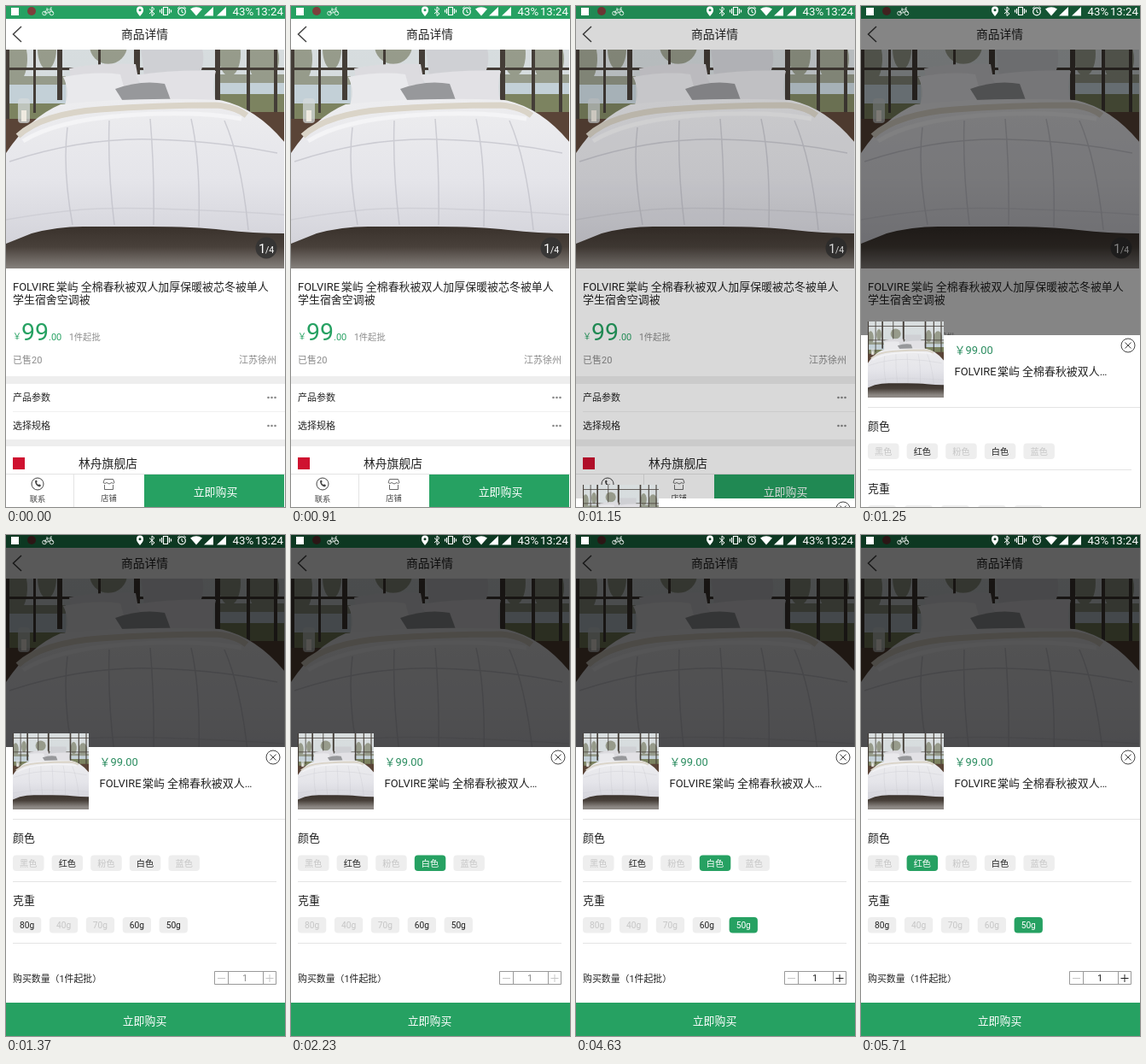
Write an HTML page that moves like this. It is 327 by 586 pixels and loops after 7010 ms.

```html
<!DOCTYPE html>
<html lang="zh-CN">
<head>
<meta charset="utf-8">
<title>商品详情</title>
<style>
  html, body { margin: 0; width: 100%; height: 100%; overflow: hidden; background: #fff; }
  svg { display: block; }
  text { font-family: Roboto, "Noto Sans CJK SC", "Noto Sans CJK", sans-serif; white-space: pre; }
  .line { fill: none; stroke: #444; }
  .white { fill: none; stroke: #fff; }
</style>
</head>
<body>
<svg id="stage" width="327" height="586" viewBox="0 0 327 586">
  <defs>
    <linearGradient id="sky" x2="0" y2="1">
      <stop offset="0" stop-color="#d9dedf"/><stop offset="1" stop-color="#d3dadd"/>
    </linearGradient>
    <linearGradient id="floor" x2="0" y2="1">
      <stop offset="0" stop-color="#352d27"/><stop offset=".45" stop-color="#48403a"/><stop offset=".85" stop-color="#8c8783"/>
    </linearGradient>
    <linearGradient id="quilt" x2="0" y2="1">
      <stop offset="0" stop-color="#ededef"/><stop offset=".55" stop-color="#e5e5ea"/><stop offset="1" stop-color="#d3d3da"/>
    </linearGradient>
    <g id="bed">
      <rect y="-7" width="327" height="150" fill="url(#sky)"/>
      <g fill="#75795f" opacity=".65">
        <ellipse cx="12" cy="62" rx="13" ry="28"/><ellipse cx="48" cy="50" rx="11" ry="24"/>
        <ellipse cx="120" cy="46" rx="22" ry="22"/><ellipse cx="262" cy="56" rx="13" ry="26"/>
        <ellipse cx="302" cy="62" rx="18" ry="28"/>
        <path d="M0 82H70V92H0zM245 80H327V90H245z"/>
      </g>
      <path d="M0 92H70V114H0zM245 90H327V104H245z" fill="#c3d0d7"/>
      <path d="M0 114H70V140H0zM245 103H327V132H245z" fill="#7c8360"/>
      <path d="M0-7h4V140H0zM32-7h3V125h-3zM60-7h6V110h-6zM108-7h3V70h-3zM150-7h7V80h-7zM245-7h6V120h-6zM282-7h4V125h-4zM314-7h4V135h-4zM0 12H327v3H0zM0 72H327v3H0z" fill="#443d37"/>
      <path d="M0 132H50V200H0zM262 124H327V200H262z" fill="#5a4437"/>
      <rect x="14" y="108" width="14" height="29" rx="4" fill="#d4dadb" opacity=".75"/>
      <rect x="18" y="122" width="6" height="13" fill="#eeeae0"/>
      <path d="M0 180H327V250H0z" fill="#352d27"/>
      <rect y="250" width="327" height="70" fill="url(#floor)"/>
      <path d="M158 50H230Q234 66 226 82H162Z" fill="#cfd0d4"/>
      <path d="M74 73Q110 66 152 68L158 102 80 108Z" fill="#dcdbdf"/>
      <path d="M152 81Q200 74 246 76Q240 96 246 112L170 114Z" fill="#e2e1e5"/>
      <path d="M67 83Q106 76 134 80L143 112 68 118Q76 100 67 83Z" fill="#e9e9ec"/>
      <path d="M128 97Q158 86 186 91L193 110 140 116Z" fill="#97989b"/>
      <path d="M64 115Q150 106 250 110Q292 118 327 160V266Q290 266 255 262T170 258T90 258T30 266L0 278V172Q28 130 64 115Z" fill="url(#quilt)"/>
      <path d="M14 152Q42 126 110 121T246 116Q270 118 282 128" fill="none" stroke="#dad4c8" stroke-width="7"/>
      <path d="M20 158Q58 134 140 128T276 132" fill="none" stroke="#f4f4f6" stroke-width="5"/>
      <g fill="none" stroke="#b9b9c2" stroke-width="1.500" opacity=".6">
        <path d="M72 142Q66 190 78 256M121 134Q119 190 127 256M169 132Q174 190 173 256M217 132Q228 180 226 258M256 134Q276 180 284 262"/>
        <path d="M4 182Q90 154 170 156T318 172"/>
        <path d="M0 250Q45 242 90 238T255 240T327 248" opacity=".6"/>
      </g>
    </g>
  </defs>

  <g id="page">
    <rect width="327" height="586" fill="#fff"/>
    <rect width="327" height="15" fill="#26a162"/>
    <circle cx="30" cy="6" r="5" fill="#7d3f3c"/>
    <path d="M18 24L8.500 33 18 42" class="line" stroke-width="1.500"/>
    <svg y="51" width="326" height="256" viewBox="0 51 326 256"><use href="#bed"/></svg>
    <circle cx="305" cy="283" r="12.500" fill="#333" opacity=".85"/>
    <path d="M0 433H327V442H0zM0 507H327V515H0z" fill="#eee"/>
    <path d="M8 474.500H327" stroke="#f0f0f0"/>
    <path d="M0 547.500H327M79.500 548V586" stroke="#e4e4e4"/>
    <rect x="8" y="528" width="14" height="14" fill="#cf1230"/>
    <circle cx="37" cy="559" r="7" class="line"/>
    <path d="M34 555.500q0 6 6 7l1-2-2-1.200-1 .8q-2-1-2.200-3l1-.7-1-2z" fill="#444"/>
    <path d="M115.500 553.500H125.500L127 557.500Q125.500 559.500 124 557.500 121 560.500 118 557.500 116 559.500 114 557.500ZM115.500 560V565.500H125.500V560" class="line" stroke-width=".8"/>
    <rect x="162" y="548" width="164" height="38" fill="#26a162"/>
  </g>

  <rect id="dim" width="327" height="586"/>

  <g id="status">
    <rect x="6" y="2" width="9" height="9" fill="#fff"/>
    <path d="M45 8L48 4H53L50 8ZM48 4L50 8M47 3H49M55 8L52 2H54" class="white" stroke-width=".7"/>
    <circle cx="45" cy="8.500" r="2.300" class="white" stroke-width=".8"/>
    <circle cx="53.500" cy="8.500" r="2.300" class="white" stroke-width=".8"/>
    <path d="M157 12Q152.500 7 153 4.500A4 4 0 0 1 161 4.500Q161.500 7 157 12ZM157 3.200A1.500 1.500 0 1 0 157 6.200A1.500 1.500 0 1 0 157 3.200Z" fill="#fff" fill-rule="evenodd"/>
    <path d="M168 3.500L174 9 171 11.500V1L174 3.500 168 9" class="white"/>
    <path d="M184.500 1.500H189.500V10.500H184.500ZM182.500 3V9M191.500 3V9M180.500 4.500V7.500M193.500 4.500V7.500" class="white" stroke-width="1.200"/>
    <circle cx="206" cy="6.500" r="4.300" class="white" stroke-width="1.200"/>
    <path d="M206 4V7L208 8M201 3L203.500 1M211 3L208.500 1" class="white"/>
    <path d="M216 3.500Q223-1 230 3.500L223 11.500ZM232 11.500H243V1ZM247 11.500H258V1Z" fill="#fff"/>
  </g>

  <g id="panel">
    <rect y="248" width="327" height="338" fill="#fff"/>
    <svg x="8" y="232" width="89" height="89" viewBox="0 -7 327 327"><use href="#bed"/></svg>
    <circle cx="313" cy="260" r="8" class="line"/>
    <path d="M309.500 256.500l7 7m0-7l-7 7" class="line"/>
    <path d="M8 332.500H327M8 405.500H317M8 477.500H317" stroke="#e4e4e4"/>
    <path d="M244.500 510.500H316.500V525.500H244.500ZM260.500 510V526M301.500 510V526" fill="none" stroke="#999"/>
    <path d="M248 518.500H257" stroke="#c4c4c4"/>
    <path id="plus" d="M304.500 518.500H313.500M309 514V523"/>
    <rect y="547" width="327" height="39" fill="#26a162"/>
  </g>
</svg>
<script>
const GREEN = "#26a162", DARK = "#222", GRAY = "#8b8b8b", PALE = "#c6c6c6";
const $ = id => document.getElementById(id);

function add(parent, tag, attrs) {
  const el = document.createElementNS("http://www.w3.org/2000/svg", tag);
  for (const k in attrs) el.setAttribute(k, attrs[k]);
  return parent.appendChild(el);
}

// Places text by its vertical centre.
function label(parent, x, cy, str, size, fill = DARK, anchor = "start") {
  const el = add(parent, "text", { x, y: cy + size * .37, "font-size": size, fill, "text-anchor": anchor });
  el.textContent = str;
  return el;
}

const page = $("page"), panel = $("panel"), status = $("status");

label(status, 265.5, 6, "43%", 13.3, "#fff");
label(status, 325, 6, "13:24", 13.3, "#fff", "end");

label(page, 162.5, 33, "商品详情", 13.8, DARK, "middle");
label(page, 296, 283, "1", 15, "#fff");
label(page, 304, 285, "/4", 10.5, "#fff");
label(page, 8, 328, "FOLVIRE", 12.95);
label(page, 58.7, 328, "棠屿 全棉春秋被双人加厚保暖被芯冬被单人", 12.95);
label(page, 8, 343, "学生宿舍空调被", 12.95);
label(page, 8, 386.5, "￥", 10, GREEN);
label(page, 18, 380, "99", 28.5, GREEN);
label(page, 50, 386.5, ".00", 11, GREEN);
label(page, 74, 387, "1件起批", 10.3, GRAY);
label(page, 8, 414, "已售20", 11, GRAY);
label(page, 317, 414, "江苏徐州", 11, GRAY, "end");
label(page, 8, 458, "产品参数", 11);
label(page, 8, 491, "选择规格", 11);
for (const cy of [458, 491])
  for (const cx of [307.5, 311.5, 315.5]) add(page, "circle", { cx, cy, r: 1.3, fill: "#888" });
label(page, 85, 535, "林舟旗舰店", 13.8);
label(page, 37, 576.5, "联系", 9.3, "#444", "middle");
label(page, 120.5, 576, "店铺", 9.3, "#444", "middle");
label(page, 245.5, 568, "立即购买", 12.9, "#fff", "middle");

label(panel, 109.5, 265.5, "￥99.00", 12.9, "#2a8c5f");
label(panel, 109.5, 290.5, "FOLVIRE", 12.95);
label(panel, 160, 290.5, "棠屿 全棉春秋被双人…", 12.95);
label(panel, 8, 354, "颜色", 12.9);
label(panel, 8, 427, "克重", 12.9);
label(panel, 8, 519, "购买数量（1件起批）", 10.9);
label(panel, 162.5, 568, "立即购买", 12.9, "#fff", "middle");
const count = label(panel, 280, 518, "1", 11, DARK, "middle");

function chips(names, y, w, step) {
  return names.map((name, i) => {
    const x = 8 + i * step;
    const box = add(panel, "rect", { x, y, width: w, height: 18.5, rx: 4 });
    return { name, box, text: label(panel, x + w / 2, y + 9.3, name, 10.2, DARK, "middle") };
  });
}
const colors = chips(["黑色", "红色", "粉色", "白色", "蓝色"], 374.5, 36.5, 45.6);
const weights = chips(["80g", "40g", "70g", "60g", "50g"], 447, 33.3, 42.9);
const stock = { 红色: ["80g", "50g"], 白色: ["60g", "50g"] };

function paint(row, chosen, available) {
  for (const { name, box, text } of row) {
    const on = name === chosen;
    box.setAttribute("fill", on ? GREEN : "#eee");
    text.setAttribute("fill", on ? "#fff" : available(name) ? DARK : PALE);
  }
}

// Panel steps: start time, offset, dimming
const slide = [[0, 354, 0], [1150, 328, .15], [1250, 137, .48], [1370, 0, .65]];
// Taps: start time, chosen colour, chosen weight
const taps = [[0, "", ""], [2230, "白色", ""], [3330, "白色", "60g"], [4630, "白色", "50g"], [5710, "红色", "50g"]];
const at = (list, t) => list.filter(step => step[0] <= t).pop();

function draw(t) {
  const [, offset, dim] = at(slide, t), [, color, weight] = at(taps, t);
  panel.setAttribute("transform", `translate(0 ${offset})`);
  $("dim").setAttribute("opacity", dim);
  paint(colors, color, c => stock[c] && (!weight || stock[c].includes(weight)));
  paint(weights, weight, w => color ? stock[color].includes(w) : Object.values(stock).flat().includes(w));
  const ready = color && weight;
  count.setAttribute("fill", ready ? DARK : GRAY);
  $("plus").setAttribute("stroke", ready ? DARK : PALE);
}

const start = performance.now();
function frame() {
  draw((performance.now() - start) % 7010);
  requestAnimationFrame(frame);
}
frame();
</script>
</body>
</html>
```
